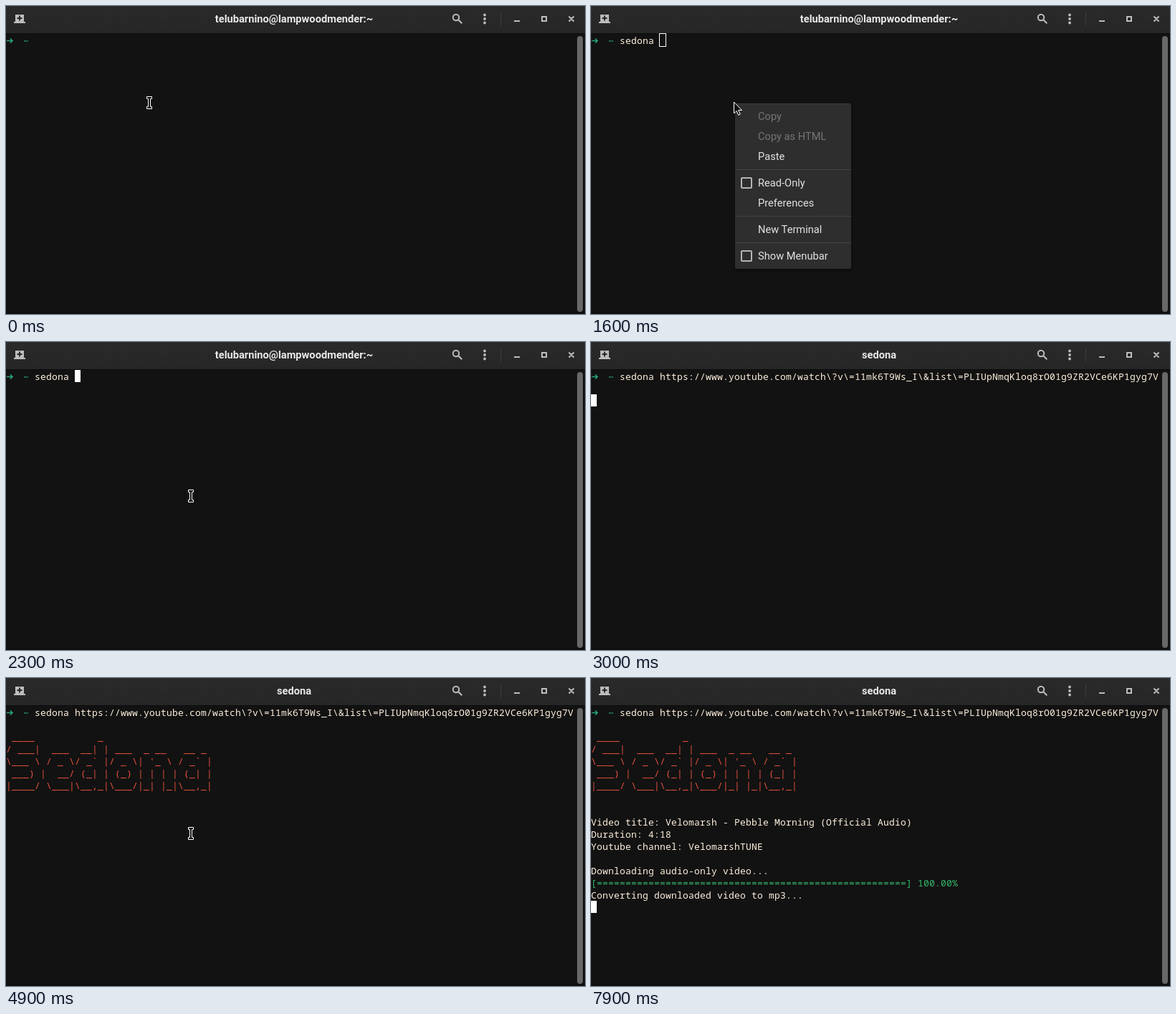
Write an HTML page that moves like this. It is 808 px wide and 430 px high and loops after 8000 ms.

```html
<!DOCTYPE html>
<html lang="en">
<head>
<meta charset="utf-8">
<title>Terminal</title>
<style>
  html, body { margin: 0; height: 100%; overflow: hidden; background: #121212; }
  svg { display: block; width: 808px; height: 430px; }
  text { white-space: pre; }
  .mono { font: 13px "Noto Sans Mono", monospace; letter-spacing: .2px; }
  .ui { font: 14.67px Roboto, sans-serif; }
  .icons { fill: none; stroke: #bdbdbd; stroke-width: 2; }
</style>
</head>
<body>
<svg viewBox="0 0 808 430">
  <defs>
    <linearGradient id="bar" x2="0" y2="1">
      <stop stop-color="#2a2a2a"/><stop offset="1" stop-color="#262626"/>
    </linearGradient>
    <filter id="shadow" x="-10%" y="-10%" width="120%" height="120%">
      <feDropShadow dx="0" dy="2" stdDeviation="2" flood-opacity=".5"/>
    </filter>
  </defs>
  <rect width="808" height="430" fill="#121212"/>
  <rect width="808" height="38" fill="url(#bar)"/>
  <path d="M0 38.5H808M0 428.5H808" stroke="#0c0c0c"/>
  <rect x="797" y="42" width="8" height="385" rx="4" fill="#686868"/>
  <path d="M690.5 8V28" stroke="#3c3c3c"/>
  <g class="icons">
    <path d="M13 12H25V22H27V24H11V22H13Z" fill="#bdbdbd" stroke="none"/>
    <path d="M19 13.5V20.5M15.5 17H22.5" stroke="#282828"/>
    <circle cx="628" cy="16" r="4.2"/>
    <path d="M631 19L636.3 24.3M709 21H717M748 15H754V21H748ZM785.5 14.5L792.5 21.5M792.5 14.5L785.5 21.5"/>
    <path d="M668 12.5h.01M668 18h.01M668 23.5h.01" stroke-width="3.8" stroke-linecap="round"/>
  </g>
  <text id="title" class="ui" x="402" y="23" text-anchor="middle" fill="#e8e8e8" style="font-weight:700"></text>
  <g id="screen" class="mono"></g>
  <g id="menu" class="ui"></g>
  <g id="pointer" fill="#111" stroke="#fff"></g>
</svg>
<script>
const LOOP = 8000, ROW = 17, COL = 8, TOP = 39;
const CREAM = '#fff0dd', RED = '#e8523d', GREEN = '#34b96c', TEAL = '#28a57c';
const URL_TEXT = String.raw`https://www.youtube.com/watch\?v\=11mk6T9Ws_I\&list\=PLIUpNmqKloq8rO01g9ZR2VCe6KP1gyg7V`;
const BANNER = [
  ' ____           _',
  '/ ___|  ___  __| | ___  _ __   __ _',
  '\\___ \\ / _ \\/ _` |/ _ \\| \'_ \\ / _` |',
  ' ___) |  __/ (_| | (_) | | | | (_| |',
  '|____/ \\___|\\__,_|\\___/|_| |_|\\__,_|'];
const INFO = [
  'Video title: Velomarsh - Pebble Morning (Official Audio)',
  'Duration: 4:18',
  'Youtube channel: VelomarshTUNE',
  '',
  'Downloading audio-only video...'];
const KEY_TIMES = [200, 400, 600, 700, 900, 1000, 1200];

const byId = id => document.getElementById(id);
const esc = s => s.replace(/&/g, '&amp;').replace(/</g, '&lt;');
const put = (col, row, s, fill = CREAM) =>
  `<text x="${col * COL}" y="${TOP + row * ROW + 14}" fill="${fill}">${esc(s)}</text>`;
const box = (x, y, w, h, fill, more = '') =>
  `<rect x="${x}" y="${y}" width="${w}" height="${h}" fill="${fill}" ${more}/>`;
const within = (t, a, b) => t >= a && t < b;

function cursor(t, typed) {
  if (within(t, 1600, 2300)) return box(95.5, 38.5, 9, 18, 'none', 'stroke="#fff"');
  const on = within(t, 100, 3700) || within(t, 4200, 4900) ||
    within(t, 5500, 6100) || within(t, 6700, 7300) || t >= 7900;
  if (!on) return '';
  const [col, row] = t < 2400 ? [5 + typed, 0] : t < 3000 ? [0, 1] : t < 3600 ? [0, 2] :
    t < 5500 ? [0, 9] : t < 6100 ? [0, 14] : [0, 16];
  return box(col * COL, TOP + row * ROW, COL, ROW, '#fff');
}

function screen(t) {
  const typed = KEY_TIMES.filter(k => t >= k).length;
  let s = `<path d="M1 48.5H9M6 45.5L9 48.5L6 51.5" fill="none" stroke="${TEAL}" stroke-width="1.6"/>` +
    `<g font-weight="700">${put(3, 0, '~', TEAL)}</g>` + put(5, 0, 'sedona '.slice(0, typed));
  if (t >= 2400) {
    const pasted = t < 3000;   // a fresh paste stays in reverse video
    if (pasted) s += box(96, TOP, URL_TEXT.length * COL, ROW, CREAM);
    s += put(12, 0, URL_TEXT, pasted ? '#121212' : CREAM);
  }
  if (t >= 3600) BANNER.forEach((line, i) => s += put(0, 2 + i, line, RED));
  if (t >= 5500) INFO.forEach((line, i) => s += put(0, 9 + i, line));
  if (t >= 6100) s += put(0, 14, `[${'='.repeat(54)}] 100.00%`, GREEN);
  if (t >= 6200) s += put(0, 15, 'Converting downloaded video to mp3...');
  return s + cursor(t, typed);
}

function menu(t) {
  if (!within(t, 1600, 2300)) return '';
  const item = (y, label, fill = '#e2e2e2') => `<text x="233" y="${y + 5}" fill="${fill}">${label}</text>`;
  const check = y => box(210, y - 7, 14, 14, 'none', 'rx="1" stroke="#b4b4b4" stroke-width="2"');
  return box(201, 136, 162, 231, '#2d2d2d', 'rx="3" filter="url(#shadow)"') +
    '<path d="M203 136.5H361" stroke="#3a3a3a"/>' +
    (t >= 1900 ? box(201, 196, 162, 28, '#3e3e3e') : '') +
    '<path d="M201 228.5H363M201 293.5H363M201 330.5H363" stroke="#424242"/>' +
    item(154, 'Copy', '#757575') + item(182, 'Copy as HTML', '#757575') + item(210, 'Paste') +
    check(247) + item(247, 'Read-Only') + item(275, 'Preferences') + item(312, 'New Terminal') +
    check(349) + item(349, 'Show Menubar');
}

function pointer(t) {
  const beam = (x, y) => `<path transform="translate(${x} ${y})" d="M-3.5 -8.5H3.5V-5.5H1.5V5.5H3.5V8.5H-3.5V5.5H-1.5V-5.5H-3.5Z"/>`;
  const arrow = (x, y) => `<path transform="translate(${x} ${y})" d="M.5 .5V16.5L4 13L6.8 18.8L9.3 17.6L6.6 12H11.5Z"/>`;
  if (t < 100) return beam(200, 135);
  if (within(t, 1600, 2300)) {
    const p = Math.min(1, Math.max(0, (t - 1700) / 300));
    const ease = p * (2 - p);
    return arrow(199 + 58 * ease, 133.5 + 80 * ease);
  }
  if (within(t, 2300, 3000)) return beam(258, 215);
  if (within(t, 4100, 5700)) {
    const p = Math.max(0, (t - 5200) / 400);
    const x = 258 + 80 * p, y = 217 - 207 * p;
    return y < 38 ? arrow(x, y) : beam(x, y);
  }
  return '';
}

let last = -1;
function draw(now) {
  const t = Math.floor(now % LOOP / 100) * 100;
  if (t !== last) {
    last = t;
    byId('title').textContent = t < 3000 ? 'telubarnino@lampwoodmender:~' : 'sedona';
    byId('screen').innerHTML = screen(t);
    byId('menu').innerHTML = menu(t);
    byId('pointer').innerHTML = pointer(t);
  }
  requestAnimationFrame(draw);
}
draw(performance.now());
</script>
</body>
</html>
```
